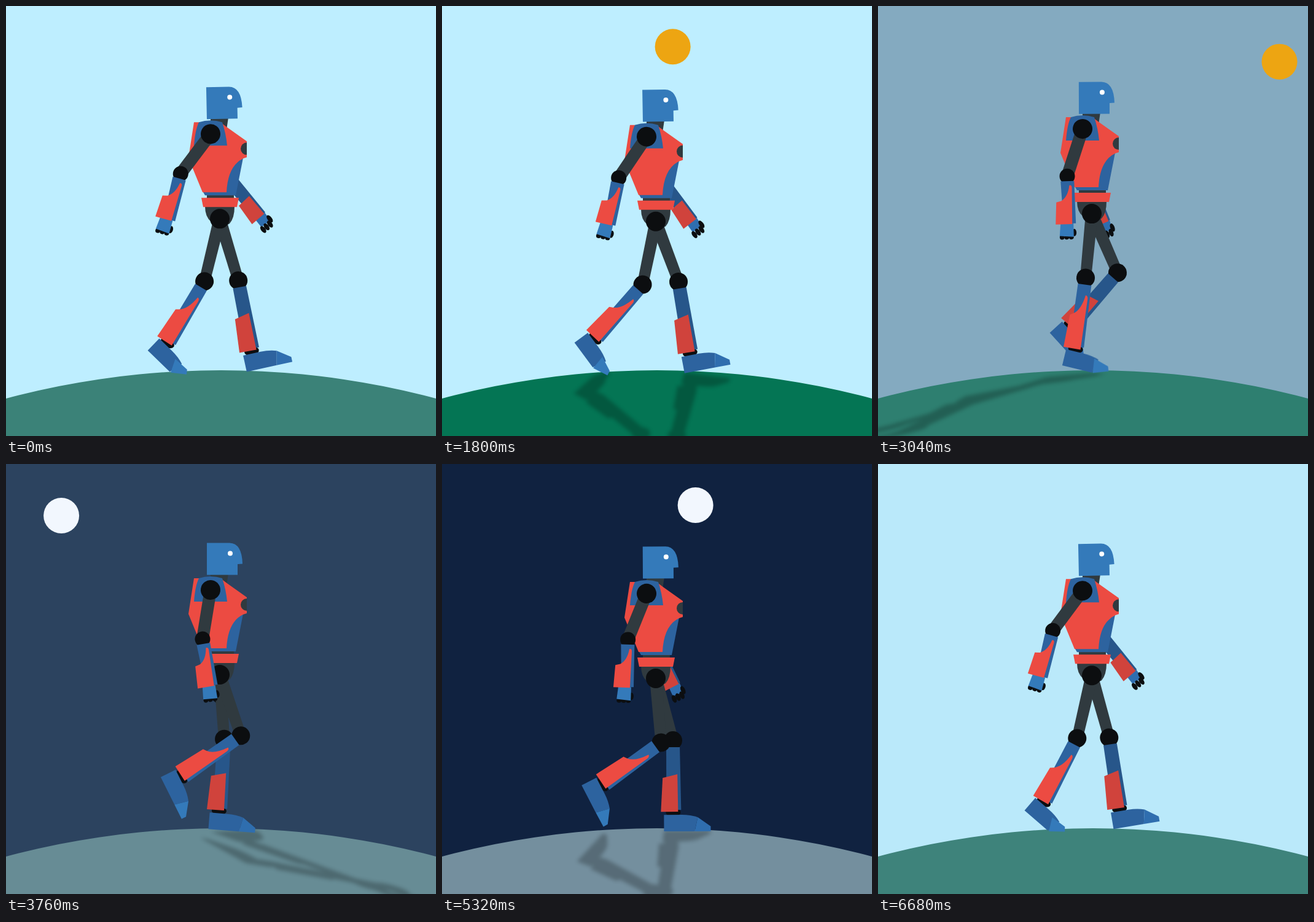
Animation of 700 by 700 pixels, one loop 6720 ms. Source, as an HTML page:

```html
<!DOCTYPE html>
<html lang="en">
<head>
<meta charset="utf-8">
<title>Walking robot</title>
<style>
  html, body { margin: 0; width: 100%; height: 100%; overflow: hidden; }
  svg { display: block; width: 100%; height: 100%; }
  .steel { fill: #303a3f; }
  .joint { fill: #0c0e10; }
  .red { fill: #ec4b42; }
  .blue { fill: #2d639f; }
  .light { fill: #347aba; }
  .far .red { fill: #d0433c; }
  .far .shell { fill: #27568a; }
  .far .light { fill: #2f6eaf; }
</style>
</head>
<body>
<svg viewBox="0 0 700 700">
  <defs>
    <clipPath id="land"><circle cx="350" cy="1947" r="1354"/></clipPath>
    <filter id="soft" filterUnits="userSpaceOnUse" x="-20" y="560" width="740" height="160">
      <feColorMatrix values="0 0 0 0 0  0 0 0 0 0  0 0 0 0 0  0 0 0 1 0"/>
      <feGaussianBlur stdDeviation="3"/>
    </filter>
  </defs>
  <rect id="sky" width="700" height="700"/>
  <circle id="orb" r="29"/>
  <circle id="ground" cx="350" cy="1947" r="1354"/>
  <g clip-path="url(#land)">
    <g id="shade" filter="url(#soft)"><use id="cast" href="#bot"/></g>
  </g>
  <g id="bot"></g>
</svg>
<script>
const LOOP = 6720, STRIDE = LOOP / 4, TICK = 40;
const HIP = 349, FLOOR = 597;
const DAY = [190, 238, 255], NIGHT = [16, 34, 64];
const GRASS = [4, 117, 84], FROST = [116, 143, 158];

const $ = id => document.getElementById(id);
const clamp = (v, a, b) => Math.min(b, Math.max(a, v));
const ramp = (t, a, b) => clamp((t - a) / (b - a), 0, 1);
const mix = (a, b, k) => `rgb(${a.map((v, i) => Math.round(v + (b[i] - v) * k))})`;
const move = (id, value) => $(id).setAttribute('transform', value);

// Cosine in turns, with its peak given in degrees.
const wave = (turn, peak = 0) => Math.cos(turn * 2 * Math.PI - peak * Math.PI / 180);

const path = (cls, d) => `<path class="${cls}" d="${d}"/>`;
const dot = (cls, x, y, rx, ry = rx) =>
  `<ellipse class="${cls}" cx="${x}" cy="${y}" rx="${rx}" ry="${ry}"/>`;

const leg = side => `<g id="${side}Thigh" class="${side}">
  ${path('steel', 'M-10 0H10L9 105H-9Z')}
  <g id="${side}Shin">
    ${dot('joint', 0, 0, 15)}
    ${dot('joint', 0, 117, 12, 7)}
    ${path('blue shell', 'M-11 11H11L13 113H-11Z')}
    ${path('red', side === 'far' ? 'M-17 61L7 55L8 116H-20Z'
      : 'M4 28Q8 28 8 34V117L-20 116L-17 63L-12 60Q0 53 4 28Z')}
    <g id="${side}Foot">
      ${path('blue', 'M-15 3H14Q28 3 40 7L35 30H-15Z')}
      <g id="${side}Toe">${path('light', 'M40 7L61 22V30H35Z')}</g>
    </g>
  </g></g>`;

const fingers = (x, y, gap, r, long) =>
  [0, 1, 2].map(i => dot('joint', x + i * gap, y, r, long)).join('');
const farHand = path('light', 'M-8 77H11L10 93L-8 92Z')
  + fingers(-8, 97, 7, 3.6, 6.5) + dot('joint', 11, 90, 3.5, 7);
const nearHand = fingers(-11, 99, 7.5, 4, 4) + dot('joint', 9, 92, 3.5, 6)
  + path('light', 'M-13 77H8V99L-15 97Z');

const arm = side => `<g id="${side}Arm" class="${side}">
  ${path('steel', 'M-10 0H10V81H-10Z')}
  ${dot('joint', 0, 0, 16)}
  <g id="${side}Fore">
    ${dot('joint', 0, 0, 12.5)}
    ${side === 'far' ? farHand : nearHand}
    ${path('blue shell', 'M-11 8H11L12 77H-8Z')}
    ${path('red', side === 'far' ? 'M-15 42L8 40L9 78L-17 79Z'
      : 'M3 15Q7 14 7 19L6 78H-21L-19 42L-11 40Q0 34 3 15Z')}
  </g></g>`;

const body = `
  ${path('steel', 'M333 184H362L359 204H333Z')}
  <g id="head">
    ${path('light', 'M327 134.500H364Q384 135 385 168.500L377 169V186.500H327Z')}
    <circle cx="365" cy="151.500" r="4" fill="#fff"/>
  </g>
  ${path('steel', 'M327 308H371V317H327Z')}
  ${path('blue', 'M386 250L374 311H324L320 304L350 240Z')}
  ${path('red', 'M306 192H349L361 201L392 223V249L386 251Q361 263 359 306H320L297 250Z')}
  ${path('steel', 'M392 225A10 10 0 0 0 392 245Z')}
  ${path('blue', 'M314 192Q333 186 352 192Q358 210 360 230H306Q308 204 314 192Z')}
  ${path('steel', 'M324 329H372Q372 348 364 357Q348 366 334 354Q324 346 324 329Z')}
  ${path('red', 'M318 315H379L376 330H321Z')}
  ${dot('joint', 348, HIP, 16)}`;

$('bot').innerHTML = arm('far') + leg('far') + leg('near') + body + arm('near');

// Limb angles are measured forward from straight down; turn 0 is the heel strike.
function poseLeg(side, turn) {
  const thigh = 6.4 + 17.8 * wave(turn, -18) + 5.1 * wave(2 * turn, 164)
    + 4.2 * wave(3 * turn, 114);
  const shin = -19.7 + 29.5 * wave(turn, 50) + 10 * wave(2 * turn, -17)
    + 2.8 * wave(3 * turn, -48);
  const push = Math.sin(Math.PI * ramp(turn % 1, 0.24, 0.67));
  const foot = -1.15 * shin + 9 * push;
  move(side + 'Thigh', `translate(348 ${HIP}) rotate(${-thigh})`);
  move(side + 'Shin', `translate(0 105) rotate(${thigh - shin})`);
  move(side + 'Foot', `translate(0 118) rotate(${foot + shin})`);
  move(side + 'Toe', `rotate(${-40 * push} 36 27)`);
}

function poseArm(side, turn) {
  const upper = -7 + 30 * wave(turn);
  const fore = 11.5 + 27 * wave(turn);
  move(side + 'Arm', `translate(333 211) rotate(${-upper})`);
  move(side + 'Fore', `translate(0 81) rotate(${upper - fore})`);
}

function poseBot(turn) {
  poseLeg('far', turn);
  poseLeg('near', turn + 0.5);
  poseArm('far', turn);
  poseArm('near', turn + 0.5);
  move('bot', `translate(0 ${344.2 + 7 * wave(2 * turn, 72) - HIP})`);
  move('head', `rotate(${-0.6 - 0.6 * wave(2 * turn)} 345 187)`);
}

// Sun and moon cross at an even pace and hurry near the horizon.
function light(t) {
  const isDay = t < LOOP / 2;
  const u = isDay ? (t - 1675) / 1600 : (t - 5007) / 1640;
  const angle = 10 * u + 2.3 * u ** 7;
  const rad = angle * Math.PI / 180;
  $('orb').setAttribute('cx', 350 + 1881 * Math.sin(rad));
  $('orb').setAttribute('cy', 1947 - 1881 * Math.cos(rad));
  $('orb').setAttribute('fill', isDay ? '#eda512' : '#f2f7fe');

  // The shadow is the figure mirrored at the floor and sheared away from the light.
  const tilt = Math.abs(angle);
  const size = 0.7 - tilt * 0.012;
  const lean = angle * tilt / 24 * size;
  move('cast', `matrix(1 0 ${lean} ${-size} ${-lean * FLOOR} ${FLOOR * (1 + size)})`);
  $('shade').setAttribute('opacity', 0.25 * ramp(tilt, 12, 9.5));
}

function tint(t) {
  // The ground warms up slowly, past the end of the loop.
  const u = t < 1000 ? t + LOOP : t;
  const dark = ramp(u, 2570, 3990) - ramp(u, 5920, 6700);
  const cold = ramp(u, 2505, 3930) - ramp(u, 5990, 7430);
  $('sky').setAttribute('fill', mix(DAY, NIGHT, dark));
  $('ground').setAttribute('fill', mix(GRASS, FROST, cold));
}

const start = performance.now();
function frame() {
  const now = (performance.now() - start) % LOOP;
  const t = Math.floor(now / TICK) * TICK;
  poseBot(t / STRIDE);
  light(t);
  tint(t);
  requestAnimationFrame(frame);
}
frame();
</script>
</body>
</html>
```
